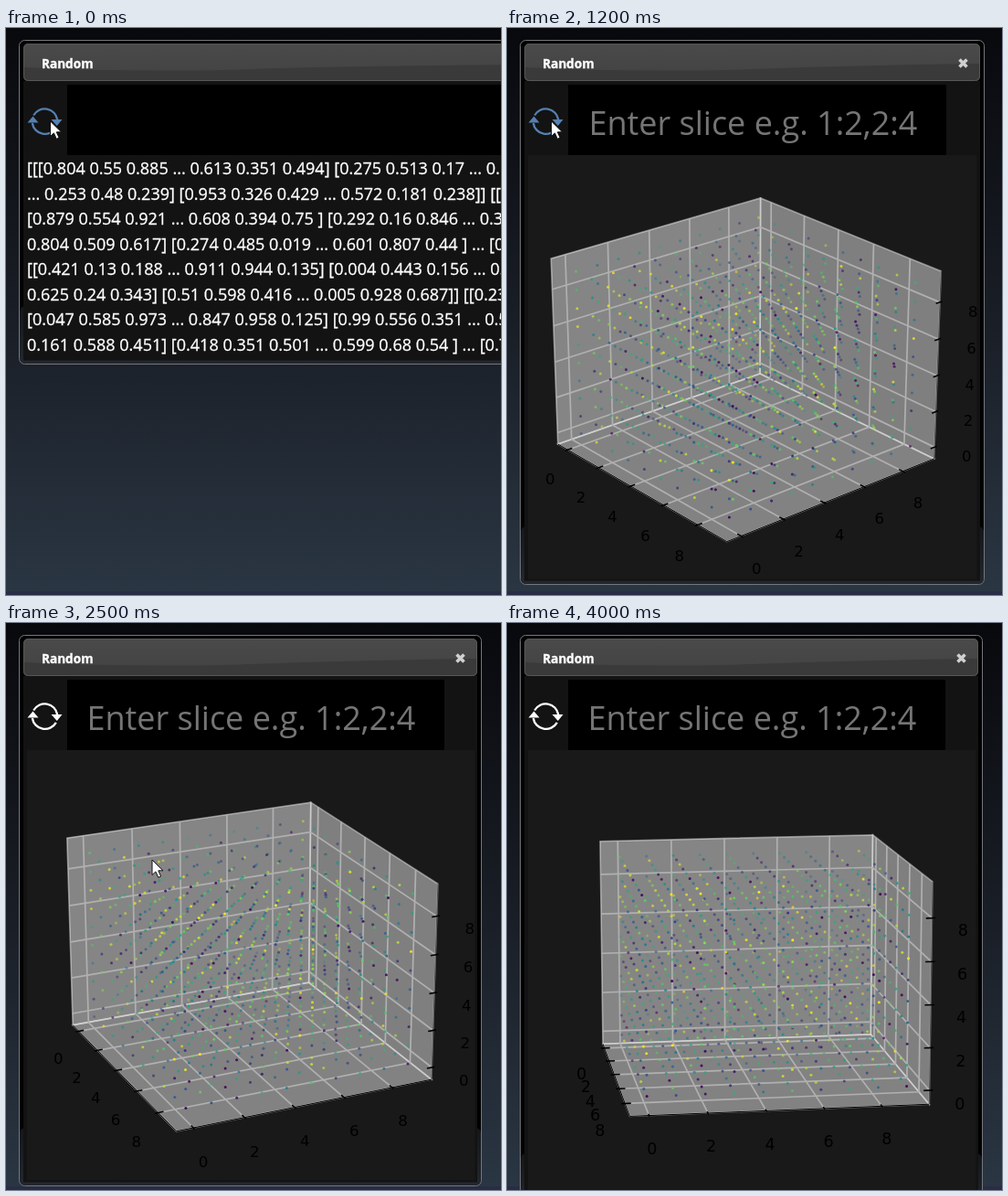
An HTML page that plays this animation: 542x620 px, repeating every 4100 ms.

```html
<!DOCTYPE html>
<html lang="en">
<head>
<meta charset="utf-8">
<title>Random</title>
<style>
  html, body { margin: 0; width: 100%; height: 100%; overflow: hidden; background: #0a0b10; }
  svg { display: block; width: 542px; height: 620px; }
  text { white-space: pre; }
  .ui { font-family: "Open Sans", "Noto Sans", sans-serif; }
  .bold { font-weight: 700; stroke: #fff; stroke-width: .35; }
  .row { stroke: #fff; stroke-width: .3; }
  .tick { font-family: "DejaVu Sans", sans-serif; text-anchor: middle; }
</style>
</head>
<body>
<svg id="stage" viewBox="0 0 542 620" xmlns="http://www.w3.org/2000/svg">
  <defs>
    <linearGradient id="sky" x1="0" y1="0" x2="0" y2="1">
      <stop offset="0" stop-color="#08090d"/>
      <stop offset=".5" stop-color="#191d25"/>
      <stop offset="1" stop-color="#2a3643"/>
    </linearGradient>
    <linearGradient id="bar" x1="0" y1="0" x2="0" y2="1">
      <stop offset="0" stop-color="#4a4a4a"/>
      <stop offset="1" stop-color="#424242"/>
    </linearGradient>
    <linearGradient id="foot" x1="0" y1="0" x2="0" y2="1">
      <stop offset="0" stop-color="#14171b"/>
      <stop offset="1" stop-color="#23282f"/>
    </linearGradient>
  </defs>
  <rect width="542" height="620" fill="url(#sky)"/>
  <rect y="616" width="542" height="4" fill="#282d45"/>
  <g id="scenes"></g>
  <g id="icon" fill="none" stroke-width="2.3">
    <path d="M30.2 95.5A14 14 0 0 1 56.2 100"/>
    <path d="M54.8 108.9A14 14 0 0 1 28.8 104"/>
    <path d="M23.5 103.5L29.5 96.5L35.5 103.5ZM49.5 100H61.5L55.8 107Z" stroke="none"/>
  </g>
  <path id="cursor" d="M0 0V16.5L3.9 12.9L6.8 19.3L9.6 18L6.8 11.8H12Z" fill="#fff" stroke="#111" stroke-width="1"/>
</svg>
<script>
const LOOP = 4100, STEP = 100;
const PLOT_AT = 1200, LEAVE_AT = 1300;

const views = [
  { at: PLOT_AT, el: 24, az: -40, s: 2500, cx: 260.3, cy: 362.8, right: 522.5, bottom: 608.5 },
  { at: 2500, el: 22, az: -24.8, s: 2525, cx: 264.3, cy: 365.8, right: 520.5, bottom: 615.5 },
  { at: 2800, el: 12, az: -8.6, s: 2655, cx: 275, cy: 376.8, right: 520.5, bottom: 643.5 }
];

const rows = [
  "[[[0.804 0.55 0.885 ... 0.613 0.351 0.494] [0.275 0.513 0.17 ... 0.18",
  "... 0.253 0.48 0.239] [0.953 0.326 0.429 ... 0.572 0.181 0.238]] [[0.",
  "[0.879 0.554 0.921 ... 0.608 0.394 0.75 ] [0.292 0.16 0.846 ... 0.31",
  "0.804 0.509 0.617] [0.274 0.485 0.019 ... 0.601 0.807 0.44 ] ... [0.6",
  "[[0.421 0.13 0.188 ... 0.911 0.944 0.135] [0.004 0.443 0.156 ... 0.2",
  "0.625 0.24 0.343] [0.51 0.598 0.416 ... 0.005 0.928 0.687]] [[0.231",
  "[0.047 0.585 0.973 ... 0.847 0.958 0.125] [0.99 0.556 0.351 ... 0.52",
  "0.161 0.588 0.451] [0.418 0.351 0.501 ... 0.599 0.68 0.54 ] ... [0.71"
];

const rect = (x, y, r, b, fill, extra = "") =>
  `<rect x="${x}" y="${y}" width="${r - x}" height="${b - y}" fill="${fill}" ${extra}/>`;
const text = (x, y, size, fill, str, cls = "ui") =>
  `<text x="${x}" y="${y}" font-size="${size}" fill="${fill}" class="${cls}">${str}</text>`;

function panel(right, bottom, body) {
  const r = right - 4.5;
  return rect(14.5, 13.5, right, bottom, "#000", 'rx="6"') +
    rect(15, bottom - 63, right - .5, bottom - .5, "url(#foot)", 'rx="5"') +
    rect(14.5, 13.5, right, bottom, "none", 'rx="6" stroke="#74777b"') +
    rect(19, 58, r, bottom - 4, "#131313") +
    rect(19, 17, r, 58, "url(#bar)", 'rx="5"') +
    `<path d="M19 43Q150 49 268 45T${r} 39V53Q${r} 58 ${r - 5} 58H24Q19 58 19 53Z" fill="#3a3a3a"/>` +
    rect(19.5, 17.5, r - .5, 57.5, "none", 'rx="5" stroke="#575757"') +
    text(39, 44, 13.6, "#fff", "Random", "ui bold") + body;
}

function listScene() {
  return panel(700, 367.5,
    rect(67, 62, 700, 139, "#000") +
    rows.map((s, i) => text(23, 160 + i * 27.55, 18, "#fff", s, "ui row")).join(""));
}

// Camera on a 4:4:3 box; x, y, z run from 0 to 1 across it.
function project(v, x, y, z) {
  const rad = Math.PI / 180, a = v.az * rad, e = v.el * rad;
  const X = (x - .5) * 1.1428, Y = (y - .5) * 1.1428, Z = (z - .5) * .8572;
  const side = Y * Math.cos(a) - X * Math.sin(a);
  const near = X * Math.cos(a) + Y * Math.sin(a);
  const up = Z * Math.cos(e) - near * Math.sin(e);
  const depth = near * Math.cos(e) + Z * Math.sin(e);
  const k = v.s / (9.6 - depth);
  return { x: v.cx + side * k, y: v.cy - up * k, depth };
}

const viridis = [[68, 1, 84], [59, 82, 139], [33, 145, 140], [94, 201, 98], [253, 231, 37]];
function colour(u) {
  const i = Math.min(3, Math.floor(u * 4)), f = u * 4 - i;
  return `rgb(${viridis[i].map((c, j) => Math.round(c + (viridis[i + 1][j] - c) * f))})`;
}

const frac = n => (n + .656) / 10.312;
let seed = 20;
const rnd = () => (seed = (seed * 1664525 + 1013904223) % 4294967296) / 4294967296;
const points = Array.from({ length: 1000 }, (_, i) => ({
  x: frac(Math.floor(i / 100)), y: frac(Math.floor(i / 10) % 10), z: frac(i % 10), fill: colour(rnd())
}));

function plot(v) {
  const at = (...p) => project(v, ...p);
  const path = pts => "M" + pts.map(p => {
    const q = at(...p);
    return q.x.toFixed(2) + " " + q.y.toFixed(2);
  }).join("L");
  const line = (pts, stroke, w) => `<path d="${path(pts)}" fill="none" stroke="${stroke}" stroke-width="${w}"/>`;
  const pane = (g, pts) => {
    const c = `rgba(${g},${g},${g},.5)`;
    return `<path d="${path(pts)}Z" fill="${c}" stroke="${c}" stroke-width="1.6"/>`;
  };
  const label = (p, n) => {
    const q = at(...p);
    return text(q.x.toFixed(1), (q.y + 14.5).toFixed(1), 16.5 * v.s / 2500, "#000", n, "tick");
  };

  let out = pane(242, [[0, 0, 0], [0, 1, 0], [0, 1, 1], [0, 0, 1]]) +
    pane(230, [[0, 1, 0], [1, 1, 0], [1, 1, 1], [0, 1, 1]]) +
    pane(236, [[0, 0, 0], [1, 0, 0], [1, 1, 0], [0, 1, 0]]);
  let ticks = "";
  const o = .084;
  for (let n = 0; n < 10; n += 2) {
    const t = frac(n);
    out += line([[t, 0, 0], [t, 1, 0], [t, 1, 1]], "#b0b0b0", 1.7) +
      line([[1, t, 0], [0, t, 0], [0, t, 1]], "#b0b0b0", 1.7) +
      line([[0, 0, t], [0, 1, t], [1, 1, t]], "#b0b0b0", 1.7);
    ticks += line([[t, -.012, 0], [t, .02, 0]], "#000", 1.6) +
      line([[1.012, t, 0], [.98, t, 0]], "#000", 1.6) +
      line([[1, 1.012, t], [1, .98, t]], "#000", 1.6) +
      label([t, -o, -o], n) + label([1 + o, t, -o], n) + label([1 + o, 1 + o, t], n);
  }
  out += line([[0, 0, 0], [1, 0, 0], [1, 1, 0]], "#000", 1) +
    line([[1, 1, 0], [1, 1, 1]], "#222", .6) + ticks;

  return out + points.map(p => ({ ...at(p.x, p.y, p.z), fill: p.fill }))
    .sort((a, b) => a.depth - b.depth)
    .map(d => `<circle cx="${d.x.toFixed(1)}" cy="${d.y.toFixed(1)}" r="1.5" fill="${d.fill}" ` +
      `opacity="${Math.min(1, Math.max(.3, .3 + .7 * (d.depth + .75) / 1.2)).toFixed(2)}"/>`).join("");
}

function plotScene(v) {
  const edge = v.right < 522 ? -1 : 0;
  const cx = v.right - 23;
  return panel(v.right, v.bottom,
    `<path d="M${cx - 4} 34.5l8 8m0 -8l-8 8" stroke="#d0d0d0" stroke-width="3.6"/>` +
    rect(67, 62, 481 + edge, 139, "#000") +
    text(89.5 + edge, 117, 36, "#757575", "Enter slice e.g. 1:2,2:4") +
    rect(23, 139, 514.5 + edge, v.bottom - 6, "#191919") + plot(v));
}

const byId = id => document.getElementById(id);
const icon = byId("icon"), cursor = byId("cursor");
byId("scenes").innerHTML = [listScene(), ...views.map(plotScene)].map(s => `<g>${s}</g>`).join("");
const scenes = [...byId("scenes").children];

const ease = (t, a, b) => {
  const u = Math.min(1, Math.max(0, (t - a) / (b - a)));
  return u * u * (3 - 2 * u);
};

function draw(t) {
  const current = views.filter(v => t >= v.at).length;
  scenes.forEach((g, i) => g.setAttribute("display", i === current ? "inline" : "none"));

  const tint = t <= LEAVE_AT ? "#557fb0" : "#fff";
  icon.setAttribute("stroke", tint);
  icon.lastElementChild.setAttribute("fill", tint);

  const go = ease(t, PLOT_AT, 1800), drag = ease(t, 1900, 2500);
  const x = 48.5 + 142 * go - 30.5 * drag, y = 102 + 170 * go - 13 * drag;
  cursor.setAttribute("transform", `translate(${x.toFixed(1)} ${y.toFixed(1)})`);
  cursor.setAttribute("display", t < views[2].at ? "inline" : "none");
}

const start = performance.now();
function tick() {
  const t = (performance.now() - start) % LOOP;
  draw(Math.floor(t / STEP) * STEP);
  requestAnimationFrame(tick);
}
draw(0);
requestAnimationFrame(tick);
</script>
</body>
</html>
```
